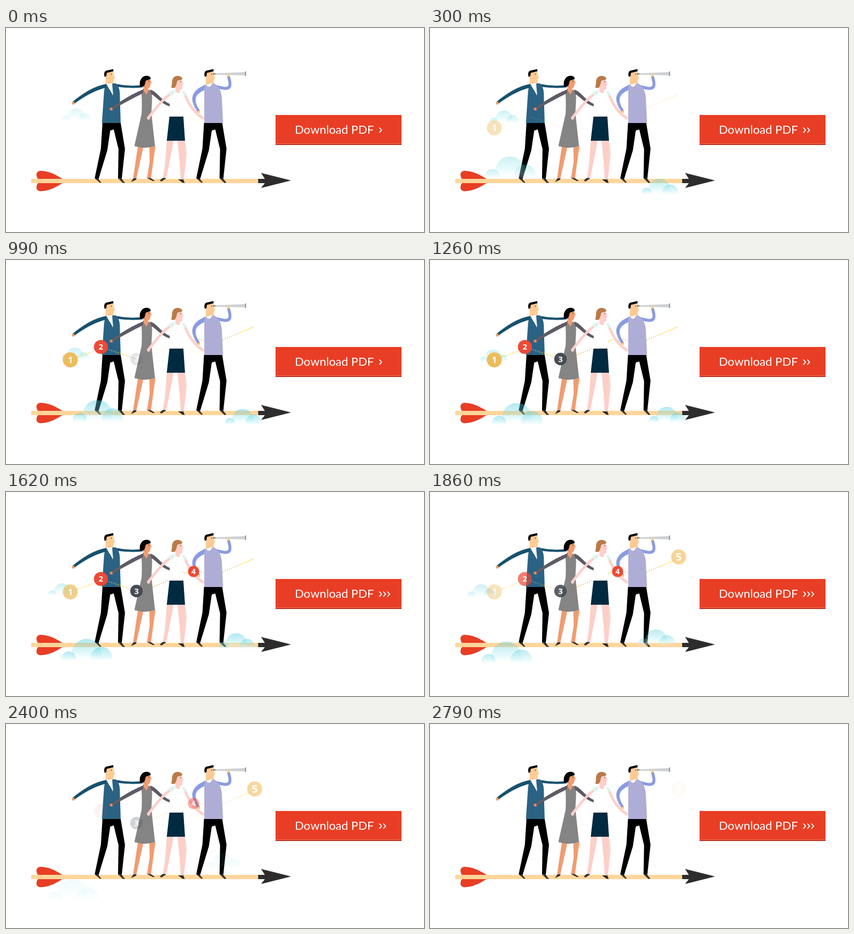
Recreate the animation shown at these times as an HTML page. Size 780 by 380 pixels, loop 2.82 s.

```html
<!DOCTYPE html>
<html lang="en">
<head>
<meta charset="utf-8">
<title>Download PDF</title>
<style>
html, body { margin: 0; width: 100%; height: 100%; overflow: hidden; background: #fff; }
svg { display: block; width: 780px; height: 380px; }
.label { font: 22px Lato, "Open Sans", sans-serif; fill: #fff; }
.badge text { font-family: "Open Sans", "Noto Sans", sans-serif; font-weight: 700; fill: #fff; text-anchor: middle; }
.chevron { fill: none; stroke: #fff; stroke-width: 1.8; }
.dots path { fill: none; stroke: #efc62f; stroke-width: 1.8; stroke-linecap: round; stroke-dasharray: .1 4.2; }
.shoe { fill: #302f31; }
</style>
</head>
<body>
<svg viewBox="0 0 780 380" xmlns="http://www.w3.org/2000/svg">
  <defs>
    <linearGradient id="mist" x1="0" y1="0" x2="0" y2="1">
      <stop offset="0" stop-color="#45c8dc" stop-opacity=".43"/>
      <stop offset=".38" stop-color="#85e2ea" stop-opacity=".32"/>
      <stop offset=".56" stop-color="#dcf8fa" stop-opacity=".36"/>
      <stop offset=".74" stop-color="#fff" stop-opacity="0"/>
    </linearGradient>
    <clipPath id="base"><rect x="-50" y="0" width="100" height="42"/></clipPath>
    <g id="cloud" clip-path="url(#base)" fill="url(#mist)">
      <circle cx="0" cy="28" r="28"/>
      <circle cx="28" cy="35" r="20"/>
      <circle cx="-33" cy="37" r="13.5"/>
    </g>
    <g id="trousers">
      <path d="M180 177H214L222 225 216 281 209 280 210 226 201 189 194.500 191 189 228 172.500 282 165.500 280 177 225Z"/>
      <path class="shoe" d="M165.500 280 172 281 178 288H175ZM209 280 216 281 222 288.500H218Z"/>
    </g>
    <g id="head">
      <path fill="#fdcb95" d="M186 83 200 80 201.500 88 203.500 94 201 95 200.500 102 198 104 186 105Z"/>
      <path d="M184 91C182 84 184 79 189 79L200 76.500 200.500 80.500 188 83.500 187 90Z"/>
      <circle cx="196.500" cy="86" r=".8"/>
    </g>
  </defs>

  <!-- arrow -->
  <path fill="#e83e25" d="M60 282C54 273 57 266 65 266 82 266 97 276 107 282V288C97 294 82 304 65 304 57 304 54 297 60 288Z"/>
  <path fill="#ffd59a" d="M47 281H471V289H47Z"/>
  <path fill="#2d2d2d" d="M470.500 281H483L476 270 532 284 476 298 483 289H470.500Z"/>

  <!-- man in jacket -->
  <use href="#trousers"/>
  <use href="#head"/>
  <path fill="#17516d" d="M200 103C218 107 236 109 255 106V110.500C238 113 218 111 205 109Z"/>
  <path fill="#2a6284" d="M185 105 204 103C211 108 213 116 212.500 130L214 177H179L183 118Z"/>
  <path fill="#17516d" d="M188 104C164 108 143 122 123.500 138L127 141.500C144 129 163 117 187 111Z"/>
  <path fill="#fff" d="M187 104 198 103 200 126Z"/>
  <circle cx="125.500" cy="140" r="2.700" fill="#f0a16c"/>

  <g class="dots">
    <path d="M134 181 165 170"/>
    <path d="M189 166 246 185"/>
    <path d="M274 177 342 148"/>
    <path d="M360 148 390 155 462 124.500"/>
  </g>

  <!-- woman in grey dress -->
  <path fill="#f19c70" d="M246 221 256 223 249 255 243 281H237L241 254ZM267.500 222 279 220 276 240 270.500 280H263L268 250Z"/>
  <path class="shoe" d="M233 287 238 280 244 280 242 283ZM263 279.500H270L278 285H274Z"/>
  <path fill="#f19c70" d="M257 95 268 93 269.500 97 272 103 269.500 104 269 110 265 112 267 117 262 125 256 116Z"/>
  <path d="M250 109C248 99 253 89 262 89 267 89 270 91 270 95L261 98 258 108 253 110Z"/>
  <circle cx="266.500" cy="99" r=".8"/>
  <path fill="#848484" d="M255 114 262 124 267 115 271 116C275 132 270 150 272 165L278 220Q259 226 239.500 220L253 160Q254 145 253 124Z"/>
  <path fill="#5f5a66" d="M257 114C236 122 214 136 195 149L198 153C217 141 236 131 255 122ZM269 115C281 117 288 134 308 142.500L307 146.500C290 142 281 128 271 123Z"/>
  <circle cx="196.300" cy="151" r="2.700" fill="#e58c5e"/>

  <!-- woman in skirt -->
  <path fill="#fdcfc8" d="M300 209H313L307 240 299 280 293 279 297 250ZM320 209H334L337 235 332 282 326 281 324 250Z"/>
  <path class="shoe" d="M287 284 293 279 299 280 290 286ZM321 282 331 282 333.500 289 329 288Z"/>
  <path fill="#fff" d="M306 124 314 117 331 116 333 127 331 165H305Z"/>
  <path fill="#fdcfc8" d="M316 98 327 94 329 99 331.500 104 329.500 106 329 114 325 116 324 122 316 119Z"/>
  <path fill="#b87a48" d="M308 111C311 107 308 99 312 93 317 87 327 89 329 94L328 96 320 98C318 102 319 107 314 112Z"/>
  <circle cx="326" cy="100" r=".8"/>
  <path fill="none" stroke="#fdcfc8" stroke-width="4.800" d="M307 123C293 132 279 150 265 168M334 124C341 142 350 157 369 169"/>
  <circle cx="266" cy="168" r="2.800" fill="#fdcfc8"/>
  <path fill="#dff3ec" d="M302 122Q307 116 314 116L315 120 309 127ZM328 116Q336 117 338 125L332 127Z"/>
  <path fill="#002a40" d="M305 165H331L334 210H300Z"/>

  <!-- man with telescope -->
  <use href="#trousers" x="189.500"/>
  <use href="#head" x="187"/>
  <path fill="#8b9be0" d="M374 105C352 113 345 126 348.500 138 351 147 355 153 358 157L362 153.500C356 146 353 138 354 131 356 123 364 118 374 114Z"/>
  <path fill="none" stroke="#8b9be0" stroke-width="5.500" d="M386 107C402 112 417 117 418 106 418 100 417 96 415 90"/>
  <path fill="#aeadd6" d="M370 109 378 104 388 103C398 108 403 120 403 135L405 177H370Z"/>
  <path fill="#fff" d="M373 107 379 104 386 103 380 110Z"/>
  <path fill="#cfd2d4" d="M387 84.500 447 82V88.500L387 87Z"/>
  <path fill="#8e9296" d="M446 81H448V89H446ZM386 84H391V87H386Z"/>
  <circle cx="414.500" cy="88" r="2.800" fill="#fdcb95"/>
  <circle cx="360" cy="156" r="2.300" fill="#fcc777"/>

  <g id="clouds"></g>
  <g id="badges"></g>

  <!-- button -->
  <path fill="#e83e25" d="M503 162H738V218H503Z"/>
  <path fill="#f0755c" d="M503 215H738V216H503Z"/>
  <path fill="#b5331f" d="M503 216H738V218H503Z"/>
  <text class="label" x="539" y="196.500">Download PDF</text>
  <path class="chevron" d="M696.500 185.500 701 190.200 696.500 195"/>
  <path class="chevron" d="M704 185.500 708.500 190.200 704 195"/>
  <path class="chevron" d="M711.500 185.500 716 190.200 711.500 195"/>
</svg>
<script>
const LOOP = 2820, STEP = 30, CHEVRON_CYCLE = LOOP / 3;
const $ = s => document.querySelector(s);
const $$ = s => [...document.querySelectorAll(s)];
const clamp = v => Math.max(0, Math.min(1, v));

// fade: [in start, in end, out start, out end]
const badges = [
  { x: 120, y: 186, r: 14, size: 16, color: '#edbd5c', fade: [60, 640, 1370, 2200] },
  { x: 177, y: 162, r: 13, size: 15, color: '#ef4935', fade: [540, 820, 1620, 2450] },
  { x: 243.5, y: 184.5, r: 11.7, size: 15, color: '#474c54', fade: [950, 1250, 1770, 2600] },
  { x: 350, y: 148, r: 10.5, size: 14, color: '#ef4935', fade: [1290, 1590, 1990, 2720] },
  { x: 464, y: 121, r: 14, size: 20, color: '#f0b94f', fade: [1650, 2010, 2050, 2820] }
];
const lineFades = [
  [200, 720, 1500, 2250],
  [120, 700, 1620, 2350],
  [930, 1260, 2050, 2700],
  [100, 700, 2050, 2790]
];
// path: [time, x, y of the top]
const clouds = [
  { scale: .56, strength: .65, fade: [-500, 300, 1900, 2400],
    path: [[0, 131, 150], [580, 144.5, 157.5], [1260, 118, 167], [2100, 87, 174], [2400, 76, 177]] },
  { scale: 1, strength: 1, fade: [0, 480, 1750, 2550],
    path: [[0, 134, 228.5], [830, 176, 258], [2100, 134.5, 283], [2500, 121, 291]] },
  { scale: .72, strength: 1, fade: [0, 350, 1750, 2550],
    path: [[0, 422, 282], [1160, 445, 276.5], [2100, 414, 249], [2500, 401, 238]] }
];

$('#badges').innerHTML = badges.map((b, i) =>
  `<g class="badge"><circle cx="${b.x}" cy="${b.y}" r="${b.r}" fill="${b.color}"/>` +
  `<text x="${b.x}" y="${b.y + b.size * .36}" font-size="${b.size}">${i + 1}</text></g>`).join('');
$('#clouds').innerHTML = clouds.map(() => '<use href="#cloud"/>').join('');

const badgeNodes = $$('.badge'), lineNodes = $$('.dots path');
const cloudNodes = $$('#clouds use'), chevrons = $$('.chevron');

function opacity([a, b, c, d], t) {
  return Math.min(clamp((t - a) / (b - a)), clamp((d - t) / (d - c)));
}

function along(path, t) {
  const next = path.findIndex(p => p[0] > t);
  if (next < 0) return path[path.length - 1].slice(1);
  const [t0, x0, y0] = path[next - 1], [t1, x1, y1] = path[next];
  const k = (t - t0) / (t1 - t0);
  return [x0 + (x1 - x0) * k, y0 + (y1 - y0) * k];
}

function draw(t) {
  badgeNodes.forEach((n, i) => n.setAttribute('opacity', opacity(badges[i].fade, t)));
  lineNodes.forEach((n, i) => n.setAttribute('opacity', opacity(lineFades[i], t)));
  clouds.forEach((c, i) => {
    const [x, y] = along(c.path, t);
    cloudNodes[i].setAttribute('transform', `translate(${x} ${y}) scale(${c.scale})`);
    cloudNodes[i].setAttribute('opacity', c.strength * opacity(c.fade, t));
  });
  const phase = t % CHEVRON_CYCLE;
  const count = phase < 210 ? 1 : phase < 570 ? 2 : 3;
  chevrons.forEach((n, i) => n.setAttribute('opacity', i < count ? 1 : 0));
}

const start = performance.now();
function tick(now) {
  const t = Math.max(0, now - start) % LOOP;
  draw(Math.floor(t / STEP) * STEP);
  requestAnimationFrame(tick);
}
draw(0);
requestAnimationFrame(tick);
</script>
</body>
</html>
```
